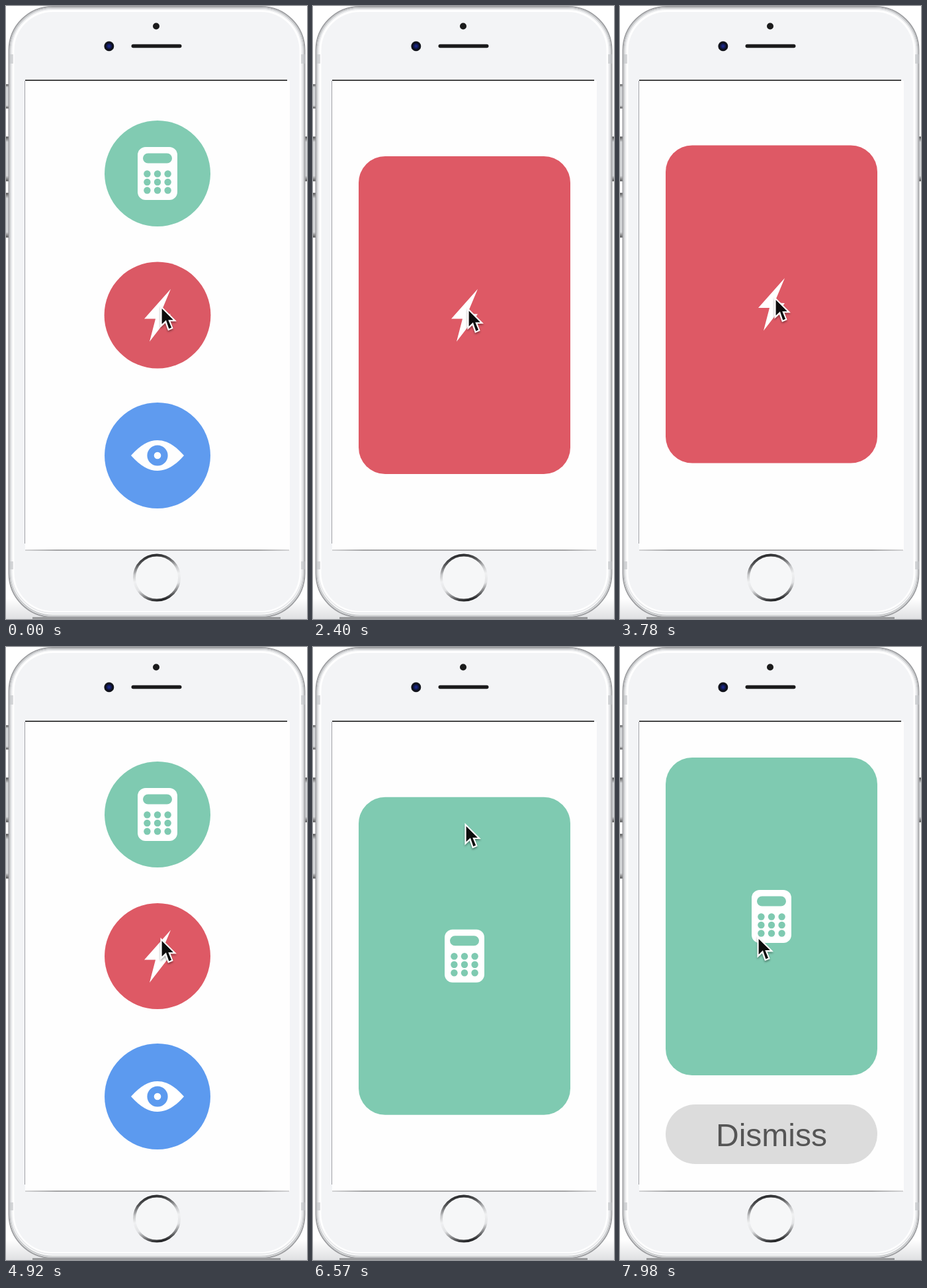
These frames come from a looping animation (455 px wide and 926 px high, 8 s). An HTML page:

```html
<!DOCTYPE html>
<html lang="en">
<head>
<meta charset="utf-8">
<title>Press, peek and dismiss</title>
<style>
  html, body { margin: 0; width: 100%; height: 100%; overflow: hidden; background: #fff; }
  svg { display: block; width: 100%; height: 100%; }
  text { font: 48px "Liberation Sans", Arial, sans-serif; }
</style>
</head>
<body>
<svg viewBox="0 0 455 926">
  <defs>
    <linearGradient id="key" x1="0" y1="0" x2="0" y2="1">
      <stop offset="0" stop-color="#555"/>
      <stop offset=".12" stop-color="#d4d6d8"/>
      <stop offset=".88" stop-color="#d4d6d8"/>
      <stop offset="1" stop-color="#555"/>
    </linearGradient>
    <linearGradient id="ring" x1=".4" y1="0" x2=".6" y2="1">
      <stop offset="0" stop-color="#2c2d2f"/>
      <stop offset=".15" stop-color="#58595b"/>
      <stop offset=".35" stop-color="#c9cacc"/>
      <stop offset=".5" stop-color="#f0f1f2"/>
      <stop offset=".7" stop-color="#e2e3e5"/>
      <stop offset=".87" stop-color="#7a7b7d"/>
      <stop offset="1" stop-color="#222325"/>
    </linearGradient>
    <linearGradient id="floor" x1="0" y1="0" x2="0" y2="1">
      <stop offset="0" stop-color="#fff"/>
      <stop offset="1" stop-color="#dfe0e2"/>
    </linearGradient>
    <linearGradient id="line">
      <stop offset="0" stop-color="#c4c4c6"/>
      <stop offset=".12" stop-color="#808082"/>
      <stop offset=".88" stop-color="#808082"/>
      <stop offset="1" stop-color="#c4c4c6"/>
    </linearGradient>
    <radialGradient id="lens">
      <stop offset="0" stop-color="#1c2c9c"/>
      <stop offset=".45" stop-color="#121a50"/>
      <stop offset=".7" stop-color="#0b0d18"/>
      <stop offset="1" stop-color="#1d1f24"/>
    </radialGradient>
    <clipPath id="clip"><rect x="29" y="113" width="400" height="708"/></clipPath>
    <filter id="soft" x="-50%" y="-50%" width="200%" height="200%">
      <feDropShadow dx="0" dy="1" stdDeviation=".8" flood-opacity=".4"/>
    </filter>
  </defs>

  <rect y="895" width="455" height="31" fill="url(#floor)"/>
  <rect x="40" y="923" width="375" height="3" fill="#98999b"/>
  <g fill="url(#key)" stroke="#858688">
    <rect x="-3" y="118.500" width="9" height="36" rx="2"/>
    <rect x="-3" y="197.500" width="9" height="67" rx="2"/>
    <rect x="-3" y="282.500" width="9" height="67" rx="2"/>
    <rect x="449" y="197.500" width="9" height="67" rx="2"/>
  </g>
  <g fill="#fff" stroke-width="2">
    <rect x="4.500" y="1" width="447" height="922" rx="66" stroke="#9fa0a3"/>
    <rect x="6.500" y="3" width="443" height="917.500" rx="64" stroke="#c9cbcd"/>
    <rect x="8.500" y="5" width="439" height="912" rx="62" stroke="#e9eaec"/>
  </g>
  <path d="M5 73h6v14H5zM446 73h6v14h-6zM5 839h6v12H5zM446 839h6v12h-6z" fill="#c4c6c9" opacity=".65"/>
  <rect x="12.500" y="9" width="431" height="905" rx="58" fill="#f3f4f6"/>

  <circle cx="227" cy="30.500" r="5" fill="#1b1b1c"/>
  <circle cx="155.800" cy="60.700" r="7.500" fill="url(#lens)"/>
  <rect x="189.500" y="57.800" width="76" height="5.500" rx="2.750" fill="#1b1b1c"/>
  <circle cx="228" cy="863.500" r="34" fill="#f6f7f8" stroke="url(#ring)" stroke-width="4"/>

  <rect x="29" y="113" width="400" height="709" fill="#fefefe"/>
  <rect x="28" y="113" width="1" height="699" fill="#a2a3a8"/>
  <rect x="29" y="111.500" width="396" height="1.500" fill="#111"/>
  <rect x="29" y="821.300" width="399" height="1.400" fill="url(#line)"/>

  <g clip-path="url(#clip)">
    <g id="tiles"></g>
    <g id="button">
      <rect x="69" width="320" height="90" rx="45" fill="#dcdcdc"/>
      <text x="229" y="62.500" text-anchor="middle" fill="#555">Dismiss</text>
    </g>
  </g>
  <g id="cursor">
    <g transform="scale(2.1)" filter="url(#soft)">
      <path fill="#fff" d="M0 0V16L3.500 12.700L5.500 18.200L9.100 16.700L7.100 11.600H11.600Z"/>
      <path fill="#0b0b0b" d="M1 2.400V13.600L4 10.700L6.100 16.900L7.900 16.100L5.600 10.600H9.200Z"/>
    </g>
  </g>
</svg>
<script>
const LOOP = 8000, CX = 229, MID = 467;
const GREY = [84, 84, 84];
const $ = id => document.getElementById(id);
const lerp = (a, b, u) => a + (b - a) * u;
const smooth = u => u * u * (3 - 2 * u);

// Value at time t along [time, value] keys, eased between neighbours.
function track(t, keys) {
  if (t <= keys[0][0]) return keys[0][1];
  for (let i = 1; i < keys.length; i++) {
    const [t0, a] = keys[i - 1], [t1, b] = keys[i];
    if (t < t1) return lerp(a, b, smooth((t - t0) / (t1 - t0)));
  }
  return keys[keys.length - 1][1];
}

function calculator() {
  let dots = "";
  for (const x of [-15.6, 0, 15.6])
    for (const y of [0.5, 13, 25.5]) dots += `<circle cx="${x}" cy="${y}" r="5.200"/>`;
  return `<rect x="-30" y="-40" width="60" height="80" rx="12" fill="#fff"/>
    <rect x="-22" y="-30.500" width="44" height="15" rx="7.500"/>${dots}`;
}
const bolt = `<path fill="#fff" d="M20-39.500L-20 5.500H-3L-12 40L20-1.500L4.500-2.500Z"/>`;
const eye = `<path fill="#fff" d="M-40 0C-26-16-13-23 0-23S26-16 40 0C26 16 13 23 0 23S-26 16-40 0Z"/>
  <circle r="15.600"/><circle r="5.300" fill="#fff"/>`;

const tiles = [
  { y: 253, color: [127, 202, 177], icon: calculator() },
  { y: 467, color: [222, 89, 101], icon: bolt },
  { y: 679, color: [92, 154, 239], icon: eye }
].map(tile => {
  const el = document.createElementNS("http://www.w3.org/2000/svg", "g");
  el.innerHTML = `<rect/><g>${tile.icon}</g>`;
  $("tiles").append(el);
  return { ...tile, el, box: el.firstChild, mark: el.lastChild };
});

const presses = [
  {
    tile: 1,
    force: [[0, .02], [800, .06], [1440, .82], [1600, .9], [2600, .9], [2900, 0]],
    open: [[1640, 0], [2150, 1], [3960, 1], [4460, 0]],
    drag: [[2420, 0], [3040, -114], [3760, -16.5], [3960, -16.5], [4460, 0]],
    button: [[2740, 0], [3000, 1], [3400, 1], [3640, 0]]
  },
  {
    tile: 0,
    force: [[5300, 0], [5670, .7], [5780, .9]],
    open: [[5800, 0], [6300, 1]],
    drag: [[6550, 0], [7180, -91], [7340, -91], [7650, -60]],
    button: [[6860, 0], [7120, 1]]
  }
];
const cursorX = [[4930, 233.5], [5260, 229.5], [7500, 229.5], [7990, 207.5]];

function drawTile(tile, y, w, h, r, color, opacity) {
  const attrs = { x: CX - w / 2, y: y - h / 2, width: w, height: h, rx: r };
  for (const k in attrs) tile.box.setAttribute(k, attrs[k]);
  tile.mark.setAttribute("transform", `translate(${CX} ${y})`);
  tile.el.setAttribute("fill", `rgb(${color.map(Math.round)})`);
  tile.el.setAttribute("opacity", opacity);
}

// The pointer drags the open card, and travels freely between presses.
function cursorY(t) {
  if (t < 3960) return track(t, [[0, 452], [1400, 455.5]]) + track(t, presses[0].drag);
  if (t < 5260) return track(t, [[4930, 439], [5260, 266]]);
  if (t < 7340) return 266 + track(t, presses[1].drag);
  return track(t, [[7340, 175], [7990, 436]]);
}

function draw(t) {
  const press = presses[t < 4800 ? 0 : 1];
  const force = track(t, press.force), open = track(t, press.open);
  const drag = track(t, press.drag), raised = track(t, press.button);

  tiles.forEach((tile, i) => {
    if (i !== press.tile) {
      drawTile(tile, tile.y, 160, 160, 80, tile.color, (1 - force) * (1 - open));
      return;
    }
    const r = 80 + 21.6 * force;
    const tint = Math.min(1, force / .8) * (1 - open);
    drawTile(tile, lerp(tile.y, MID, open) + drag,
      lerp(2 * r, 320, open), lerp(2 * r, 480, open), lerp(r, 40, open),
      tile.color.map((c, k) => lerp(c, GREY[k], tint)), 1);
  });
  $("button").setAttribute("transform", `translate(0 ${lerp(824, 691, raised)})`);
  $("cursor").setAttribute("transform", `translate(${track(t, cursorX)} ${cursorY(t)})`);
}

const start = performance.now();
function tick() {
  draw((performance.now() - start) % LOOP);
  requestAnimationFrame(tick);
}
tick();
</script>
</body>
</html>
```
